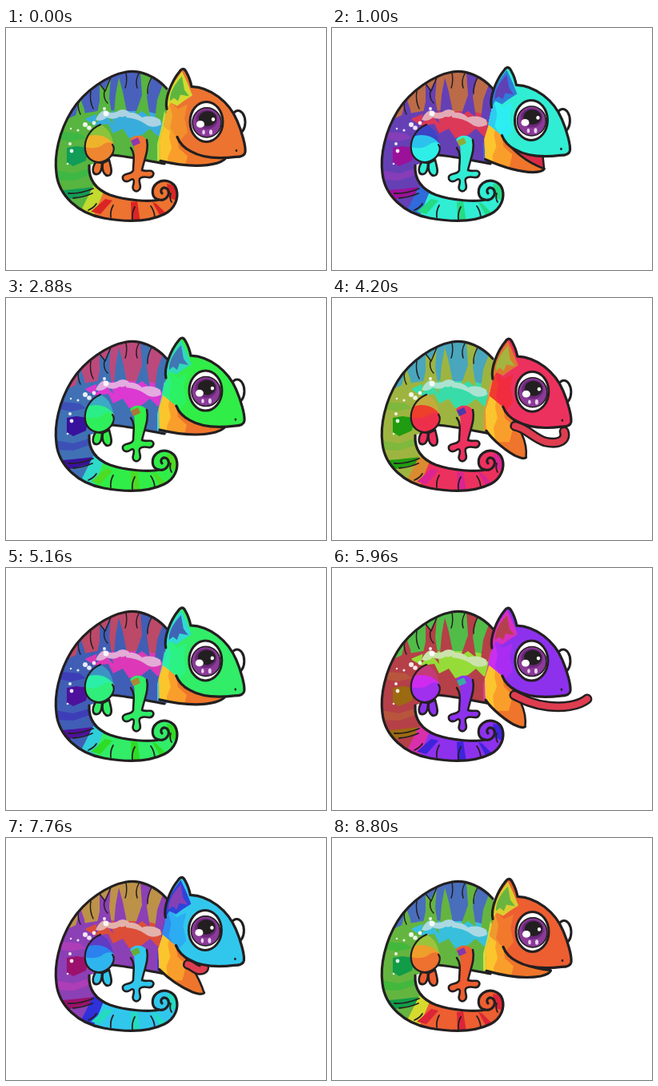
Recreate the animation shown at these times as an HTML page with a canvas. Size 400x303 px, loop 8.84 s.

```html
<!DOCTYPE html>
<html lang="en">
<head>
<meta charset="utf-8">
<title>Chameleon</title>
<style>
  html, body { margin: 0; width: 100%; height: 100%; overflow: hidden; background: #fff; }
  canvas { display: block; }
</style>
</head>
<body>
<canvas id="stage" width="400" height="303"></canvas>
<script>
const ctx = document.getElementById('stage').getContext('2d');
const LOOP = 8840, CYCLE = LOOP / 4, STEP = 40;
const INK = '#231f20';
const HINGE = [210, 140], WIDEST = 44;

const P = d => new Path2D(d);
const back = 'M201 76 C188 61 168 52 150 55 C128 59 98 78 82 104 C66 130 60 160 63 182 ' +
  'C66 210 90 232 122 238 C150 243 178 243 198 233 C212 226 216 212 213 202 ' +
  'C210 192 197 188 189 194 C181 200 181 213 191 215';
const inner = 'C180 218 150 216 130 209 C112 202 103 190 104 172';
const brow = 'C197 88 206 66 216 54 Q221 47 225 56 Q229 63 231 73 C255 74 278 92 288 116 ' +
  'C294 130 299 148 298 155 Q297 161 286 161 C262 164 242 161 230 154 C222 150 216 144 213 136';
const shape = {
  body: P(back + inner + 'L135 160 C155 162 175 167 200 170 L215 150 L205 100 Z'),
  back: P(back + 'C200 217 206 208 202 202 C198 197 191 202 195 207'),
  tailInner: P('M191 215 ' + inner),
  belly: P('M133 159 C155 161 175 166 198 170'),
  top: P('M62 120 L90 108 L120 103 L150 104 L175 106 L205 110 L215 40 L60 40 Z'),
  mid: P('M98 114 L122 104 L150 104 L175 104 L205 112 L202 128 L190 136 L180 126 L170 134 L154 138 L146 126 L134 132 L128 120 L112 122 Z'),
  pale: P('M112 115 Q116 105 123 103 Q130 108 138 105 Q146 99 154 105 Q150 113 142 111 Q134 116 126 112 Q119 118 112 115 Z ' +
    'M150 107 Q160 103 170 112 Q182 108 193 115 L194 121 Q183 127 174 120 Q164 113 150 112 Z'),
  stripes: P('M84 124 L88 106 L93 88 L98 102 L101 124 Z M111 120 L117 92 L117 70 L123 77 L131 62 L129 87 L134 120 L124 108 Z ' +
    'M135 108 L137 84 L141 62 L146 80 L152 110 L143 103 Z M161 110 L170 84 L168 55 L182 60 L176 86 L180 112 L170 104 Z ' +
    'M186 114 L189 90 L197 68 L206 76 L203 120 Z'),
  cracks: P('M92 88 Q88 98 93 108 M106 79 Q104 91 109 101 M117 70 L124 79 L131 62 M123 79 Q121 88 127 94 ' +
    'M150 56 Q152 67 149 75 M166 57 Q161 66 164 75 M182 62 Q176 73 177 82'),
  bands: P('M76 150 L88 148 L103 150 L100 166 L84 173 L76 168 Z M60 204 L83 202 L110 199 L104 208 L84 213 L72 216 Z'),
  softBands: P('M60 178 L84 182 L104 176 L105 184 L84 191 L60 190 Z M70 130 L92 132 L100 138 L82 142 L66 139 Z'),
  tailYellow: P('M109 198 L126 207 L108 240 L92 232 Z'),
  tailSkin: P('M122 205 L145 212 L180 215 L184 190 L220 186 L220 246 L105 246 Z'),
  tailBands: P('M124 214 L133 216 L118 233 L106 230 Z M156 218 L164 217 L168 243 L157 243 Z M183 218 L188 220 L201 233 L193 236 Z ' +
    'M201 195 L211 197 L214 216 L204 213 Z'),
  tailMarks: P('M78 207 Q92 208 109 201 M84 213 Q97 212 108 207 M103 228 Q110 225 113 220 M131 237 Q130 229 134 222 ' +
    'M158 240 Q157 231 161 224 M186 237 Q185 228 181 223 M207 218 Q204 213 206 207'),
  thigh: P('M117 121 C105 126 97 140 99 153 C101 166 114 171 124 166 C134 161 137 151 134 143 C131 132 127 124 117 121 Z'),
  thighLow: P('M96 148 Q110 153 120 147 Q128 140 138 146 L138 172 L98 172 Z'),
  thighMid: P('M96 139 Q108 131 123 136 Q134 141 137 151 L130 162 L100 160 Z'),
  thighLine: P('M118 121 C105 126 97 140 99 153 C101 166 114 171 124 166 C134 161 137 151 133 146'),
  toes: P('M112 168 C106 178 109 184 114 183 C119 182 120 174 120 169 Z M121 169 C119 181 125 187 130 184 C134 180 130 171 129 165 Z'),
  arm: P('M155 140 C158 134 170 132 176 140 C179 152 173 164 170 178 C175 180 179 178 182 179 C187 182 183 188 178 187 ' +
    'C173 186 169 186 167 189 C165 193 170 197 167 202 C163 207 157 203 159 197 C161 190 159 188 156 190 ' +
    'C151 194 145 192 146 186 C148 181 157 184 159 178 C159 167 162 158 160 148 Z'),
  armLine: P('M176 140 C179 152 173 164 170 178 C175 180 179 178 182 179 C187 182 183 188 178 187 ' +
    'C173 186 169 186 167 189 C165 193 170 197 167 202 C163 207 157 203 159 197 C161 190 159 188 156 190 ' +
    'C151 194 145 192 146 186 C148 181 157 184 159 178 C159 167 162 158 156 150'),
  elbow: P('M156 141 L165 137 L168 144 L159 148 Z'),
  neck: P('M198 104 L194 125 L189 145 L189 166 L204 169 L213 136 Z'),
  head: P('M200 104 ' + brow + ' L196 122 Z'),
  headLine: P('M200 101 ' + brow),
  cheek: P('M194 104 L203 90 L214 101 L226 95 L222 112 L226 130 L217 140 L194 124 Z'),
  cheekEdge: P('M194 100 L203 94 L207 109 L204 125 L212 137 L194 125 Z'),
  ear: P('M200 100 C199 84 207 69 219 54 L226 69 L232 84 L221 91 L213 97 L205 93 Z'),
  earCore: P('M204 91 C203 80 211 68 219 60 L222 77 L228 85 L217 83 L214 91 L209 87 Z')
};
const dots = [[99, 121, 3], [110, 119, 2.4], [104, 125, 2.8], [90, 128, 1.6], [80, 145, 2], [82, 154, 2.4],
  [123, 101, 2], [125, 107, 3.4], [77, 170, 1.3], [81, 126, 1.2]];

const mix = (a, b, k) => a + (b - a) * k;

function track(keys, p) {
  let i = 1;
  while (i < keys.length - 1 && keys[i][0] < p) i++;
  const [p0, v0] = keys[i - 1], [p1, v1] = keys[i];
  return mix(v0, v1, Math.min(1, Math.max(0, (p - p0) / (p1 - p0))));
}
const jawKeys = [[0, 0], [.38, 0], [.4525, 16], [.53, WIDEST], [.9, WIDEST], [.93, 30], [.982, 4], [1, 0]];
const tongueKeys = [[0, 0], [.5, 0], [.57, 1], [.87, 1], [.9, .5], [.94, 0], [1, 0]];

function fill(path, color) {
  ctx.fillStyle = color;
  ctx.fill(path);
}
function line(path, width = 3.2, color = INK) {
  ctx.lineWidth = width;
  ctx.strokeStyle = color;
  ctx.stroke(path);
}
function oval(x, y, rx, ry, color, border) {
  const o = new Path2D();
  o.ellipse(x, y, rx, ry, 0, 0, 7);
  fill(o, color);
  if (border) line(o, border);
}
function inside(path, paint) {
  ctx.save();
  ctx.clip(path);
  paint();
  ctx.restore();
}

function drawBody(c) {
  const skin = c(21, 84, 56), amber = c(42, 85, 55);
  fill(shape.body, c(108, 48, 48));
  inside(shape.body, () => {
    fill(shape.top, c(227, 46, 51));
    fill(shape.mid, c(197, 70, 54));
    fill(shape.stripes, c(108, 48, 48));
    fill(shape.pale, c(197, 50, 78));
    fill(shape.softBands, c(124, 50, 48));
    fill(shape.bands, c(150, 80, 34));
    fill(shape.tailYellow, c(68, 70, 52));
    fill(shape.tailSkin, skin);
    fill(shape.tailBands, c(360, 72, 50));
    line(shape.cracks, 1.5);
    line(shape.tailMarks, 1.8);
  });
  for (const [x, y, r] of dots) oval(x, y, r, r, 'rgba(255,255,255,.88)');
  fill(shape.neck, c(70, 70, 55));
  line(shape.back);
  line(shape.tailInner);
  line(shape.belly);

  fill(shape.toes, skin);
  line(shape.toes, 2.6);
  fill(shape.thigh, c(85, 54, 50));
  inside(shape.thigh, () => {
    fill(shape.thighMid, amber);
    fill(shape.thighLow, c(27, 85, 56));
  });
  line(shape.thighLine, 2.2);
  fill(shape.arm, skin);
  fill(shape.elbow, c(285, 50, 45));
  line(shape.armLine, 2.6);
}

function drawJaw(deg, open) {
  const a = deg * Math.PI / 180, cos = Math.cos(a), sin = Math.sin(a);
  const r = (x, y) => {
    const dx = x - HINGE[0], dy = y - HINGE[1];
    return [HINGE[0] + dx * cos - dy * sin, HINGE[1] + dx * sin + dy * cos];
  };
  // The lip swells as the jaw opens wide.
  const swell = (deg / WIDEST) ** 2;
  const lipTo = p => p.quadraticCurveTo(...r(235 + 22 * swell, 161 - 23 * swell), ...r(274, 161));
  const chin = p => {
    p.quadraticCurveTo(...r(274, 165), ...r(262, 169));
    p.bezierCurveTo(...r(243, 174), ...r(222, 173), 192, 166);
  };
  const lip = new Path2D();
  lip.moveTo(213, 136);
  lipTo(lip);

  if (open) {
    const mouth = new Path2D(lip);
    mouth.lineTo(264, 161);
    mouth.quadraticCurveTo(230, 160, 213, 136);
    fill(mouth, '#d92b45');
    line(mouth, 2.4);
    if (deg > 9) line(P('M233 157 Q237 156 241 159'), 1.5, '#f0707e');
  }
  const jaw = new Path2D('M198 118 L213 136');
  lipTo(jaw);
  chin(jaw);
  jaw.lineTo(191, 140);
  jaw.closePath();
  fill(jaw, '#ee752b');
  inside(jaw, () => {
    fill(P('M185 115 L212 128 L215 150 L226 160 L221 180 L185 180 Z'), '#fa9e2b');
    fill(P('M185 115 L206 120 L203 136 L206 150 L201 162 L203 176 L185 176 Z'), '#fbc52e');
  });
  line(lip, 2.6);
  const edge = new Path2D();
  edge.moveTo(...r(274, 161));
  chin(edge);
  line(edge);
}

function drawTongue(e) {
  if (e <= 0) return;
  const k = Math.min(1, 2 * e), m = Math.max(0, 2 * e - 1);
  const curled = [[243, 163], [252, 176], [266, 180], [283, 184], [294, 178], [290, 167]];
  const far = [[240, 166], [252, 172], [270, 174], [288, 176], [308, 174], [319, 165]];
  const q = curled.map(([x, y], i) => [
    mix(mix(228, x, k), far[i][0], m), mix(mix(160, y, k), far[i][1], m)]);
  const t = new Path2D();
  t.moveTo(228, 160);
  t.bezierCurveTo(...q[0], ...q[1], ...q[2]);
  t.bezierCurveTo(...q[3], ...q[4], ...q[5]);
  line(t, 13);
  line(t, 8, '#df3d50');
}

function drawHead(c) {
  fill(shape.head, c(21, 84, 56));
  inside(shape.head, () => {
    fill(shape.cheek, c(30, 88, 56));
    fill(shape.cheekEdge, c(40, 86, 56));
    fill(shape.ear, c(62, 70, 52));
    fill(shape.earCore, c(105, 48, 48));
  });
  line(shape.headLine);
  oval(287, 153, 1.3, 1.6, INK);
}

function drawEye() {
  oval(249.5, 117, 20.5, 25, '#fff', 3);
  oval(250, 118, 18, 18.5, '#8b3a98', 1.6);
  oval(250, 114, 13.5, 12, '#6a2878');
  oval(251, 113, 11, 9.5, '#231f20');
  oval(242, 120, 5, 4.4, '#fff');
  oval(258, 114, 2.2, 2.4, '#fff');
  oval(246, 130, 1.8, 2.8, '#e9d3f0');
  oval(255, 130, 2, 3.2, '#e9d3f0');
}

function draw(t) {
  const p = (t % CYCLE) / CYCLE;
  const hue = 360 * p - 13 * Math.sin(Math.PI * p) ** 8;
  const c = (h, s, l) => `hsl(${(h + hue) % 360}, ${s}%, ${l}%)`;
  const bob = (1 - Math.cos(2 * Math.PI * p)) / 2;
  const jaw = track(jawKeys, p), tongue = track(tongueKeys, p);

  ctx.fillStyle = '#fff';
  ctx.fillRect(0, 0, 400, 303);
  ctx.lineCap = ctx.lineJoin = 'round';
  drawBody(c);

  ctx.save();
  ctx.translate(1 - 1.6 * bob, .4 - 2 * bob);
  oval(289, 117.5, 9, 14.5, '#fff', 3);
  drawJaw(jaw, jaw > 0 && tongue === 0);
  drawTongue(tongue);
  drawHead(c);
  drawEye();
  ctx.restore();
}

const start = performance.now();
function tick() {
  const t = (performance.now() - start) % LOOP;
  draw(Math.floor(t / STEP) * STEP);
  requestAnimationFrame(tick);
}
draw(0);
requestAnimationFrame(tick);
</script>
</body>
</html>
```
